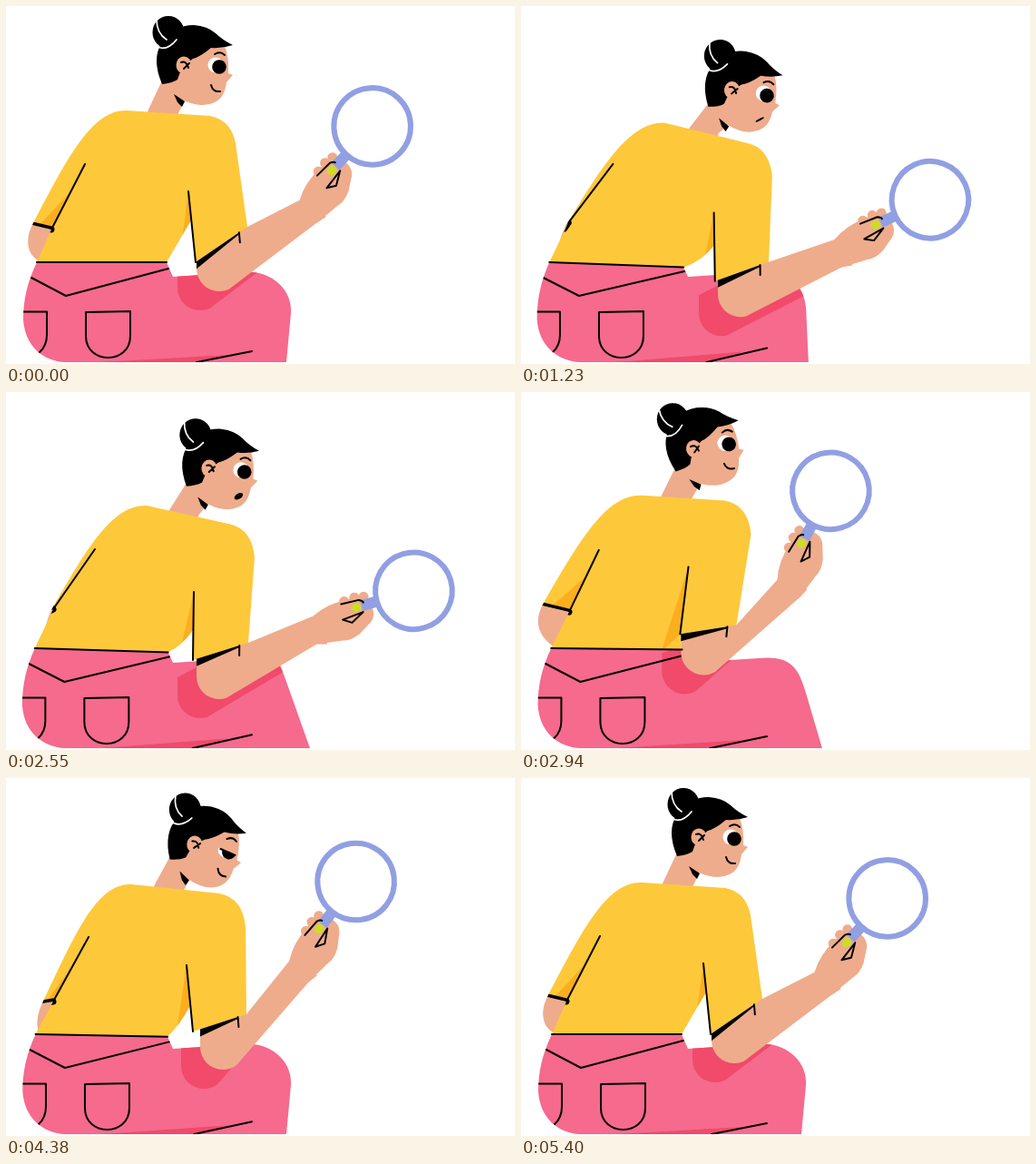
An HTML page with a canvas that plays this animation: 561 by 394 pixels, repeating every 5.43 s.

```html
<!DOCTYPE html>
<html lang="en">
<head>
<meta charset="utf-8">
<title>Woman with a magnifying glass</title>
<style>
html, body { margin: 0; width: 100%; height: 100%; overflow: hidden; background: #fff; }
canvas { display: block; width: 561px; height: 394px; }
</style>
</head>
<body>
<canvas id="stage" width="561" height="394"></canvas>
<script>
const ctx = document.getElementById('stage').getContext('2d');
const LOOP = 5430, STEP = 30;
const SKIN = '#eeac8c', SHIRT = '#fec83b', FOLD = '#fbae1e', PINK = '#f56a8d',
      RED = '#f14a6a', RING = '#919fe3', NAIL = '#cddc28', INK = '#000';

// Each joint in the six main poses.
const joints = {
  ear:      [[196, 64], [222, 83], [258, 112], [224, 83], [191, 62], [208, 72]],
  tilt:     [[0], [3], [13.5], [3], [-10], [10]],
  neck:     [[156, 116], [178, 128], [203, 150], [180, 130], [155, 115], [163, 119]],
  back:     [[133, 115], [152, 124], [172, 139], [155, 125], [133, 114], [138, 117]],
  shoulder: [[225, 121], [242, 142], [262, 171], [245, 145], [225, 120], [235, 127]],
  sleeveUp: [[201, 204], [205, 217], [231, 253], [207, 220], [185, 193], [199, 206]],
  sleeveIn: [[209, 282], [200, 294], [247, 324], [206, 295], [176, 267], [206, 279]],
  sleeveOut:[[266, 243], [261, 275], [302, 298], [267, 276], [238, 257], [265, 260]],
  armpit:   [[.4], [.6], [.15], [.55], [1], [.6]],
  elbow:    [[235, 289], [225, 309], [283, 337], [235, 313], [202, 287], [239, 296]],
  hand:     [[359, 181], [371, 229], [439, 269], [386, 237], [311, 168], [345, 166]],
  wrist:    [[-47.4], [-29.3], [-13.2], [-16], [-60], [-52]],
  cuffOut:  [[29, 241], [46, 247], [52, 240], [50, 240], [24, 235], [40, 248]],
  cuffIn:   [[50, 246], [51, 240], [55, 235], [52, 239], [53, 242], [52, 246]],
  foldTop:  [[87, 174], [97, 173], [112, 176], [98, 173], [86, 174], [91, 175]],
  lean:     [[0], [.55], [1], [.55], [.2], [.35]],
  knee:     [[314, 338], [313, 330], [317, 342], [308, 316], [313, 328], [314, 338]],
  hem:      [[309], [311], [331], [335], [332], [309]],
  mouth:    [[0], [0], [1], [.75], [0], [0]],
  lid:      [[0], [0], [0], [0], [0], [1]]
};

// time, from pose, to pose, amount
const plan = [
  [0, 0, 0, 0], [600, 1, 1, 0], [1140, 1, 2, .22], [1830, 2, 2, 0],
  [2050, 1, 2, 1.05], [2310, 2, 3, .19], [2550, 3, 3, 0], [2880, 3, 4, .9],
  [3080, 3, 4, 1.2], [3420, 4, 4, 0], [4000, 4, 5, 1.25], [4380, 5, 5, 0],
  [4600, 5, 0, .35], [5130, 5, 0, .75], [5400, 0, 0, 0], [5430, 0, 0, 0]
];
const last = plan.length - 1;
const clamp = v => Math.max(0, Math.min(1, v));

function track(poses, axis) {
  const v = plan.map(([, a, b, k]) => poses[a][axis] + (poses[b][axis] - poses[a][axis]) * k);
  const slope = i => (v[i + 1] - v[i]) / (plan[i + 1][0] - plan[i][0]);
  const tan = v.map((_, i) => {
    if (i === 0 || i === last) return 0;
    const p = slope(i - 1), q = slope(i);
    return p * q <= 0 ? 0 : 2 * p * q / (p + q);
  });
  return t => {
    let i = 0;
    while (i < last - 1 && t >= plan[i + 1][0]) i++;
    const d = plan[i + 1][0] - plan[i][0], u = (t - plan[i][0]) / d, w = 1 - u;
    return w * w * ((1 + 2 * u) * v[i] + u * d * tan[i]) +
           u * u * ((3 - 2 * u) * v[i + 1] - w * d * tan[i + 1]);
  };
}
const tracks = Object.entries(joints).map(([name, poses]) =>
  [name, poses[0].map((_, axis) => track(poses, axis))]);

function poseAt(t) {
  const p = {};
  for (const [name, axes] of tracks) p[name] = axes.length > 1 ? axes.map(f => f(t)) : axes[0](t);
  return p;
}

const add = (p, x, y) => [p[0] + x, p[1] + y];
const mix = (p, q, k) => [p[0] + (q[0] - p[0]) * k, p[1] + (q[1] - p[1]) * k];

function fill(path, color) { ctx.fillStyle = color; ctx.fill(path); }
function line(path, width = 2, color = INK) {
  ctx.strokeStyle = color; ctx.lineWidth = width; ctx.stroke(path);
}
function poly(...pts) {
  const path = new Path2D();
  pts.forEach(p => path.lineTo(...p));
  return path;
}
function oval(x, y, rx, ry = rx, turn = 0) {
  const path = new Path2D();
  path.ellipse(x, y, rx, ry, turn, 0, 7);
  return path;
}
function clipped(path, draw) {
  ctx.save(); ctx.clip(path); draw(); ctx.restore();
}
function placed([x, y], degrees, draw) {
  ctx.save(); ctx.translate(x, y); ctx.rotate(degrees * Math.PI / 180); draw(); ctx.restore();
}

function drawNeck(p) {
  const [nx, ny] = p.neck, a = p.tilt * Math.PI / 180, c = Math.cos(a), s = Math.sin(a);
  const onHead = (x, y) => add(p.ear, x * c - y * s, x * s + y * c);
  fill(poly(onHead(-24, 18), [nx, ny], [nx + 2, ny + 12], [nx + 32, ny + 18],
            [nx + 32, ny + 6], onHead(3, 36), onHead(8, 10)), SKIN);
}

function drawLeftArm(p) {
  const [x, y] = p.cuffOut, arm = new Path2D();
  arm.moveTo(x, y);
  arm.bezierCurveTo(x - 9, y + 17, x - 5, y + 35, 38, 281);
  arm.lineTo(...p.cuffIn);
  fill(arm, SKIN);
}

function armPath(p) {
  const [ex, ey] = p.elbow, r = 25, a = p.wrist * Math.PI / 180;
  const at = (x, y) => add(p.hand, x * Math.cos(a) - y * Math.sin(a), x * Math.sin(a) + y * Math.cos(a));
  const low = at(-53, 27), top = at(-48, -4);
  const dir = Math.atan2(low[1] - ey, low[0] - ex);
  const path = new Path2D();
  path.moveTo(ex - r, ey - 20);
  path.lineTo(ex - r, ey);
  path.arc(ex, ey, r, Math.PI, dir + Math.PI / 2, true);
  for (const q of [low, at(-42, 30), at(-30, -8), top, p.sleeveOut, add(p.sleeveOut, -10, -8)]) path.lineTo(...q);
  path.closePath();
  return path;
}

function drawPants(p, arm) {
  const h = p.lean, [kx, ky] = p.knee, left = 34 - 4 * h, right = [177 + 3 * h, 282 + 8 * h];
  const pants = new Path2D();
  pants.moveTo(left, 282);
  pants.lineTo(...right);
  pants.lineTo(184, 298);
  pants.lineTo(262, 293);
  pants.bezierCurveTo(294, 290, kx + (kx - p.hem) * .45, ky + (ky - 391) * .45, kx, ky);
  pants.lineTo(p.hem, 392);
  pants.lineTo(66, 392);
  pants.bezierCurveTo(40, 391, 21 - 2 * h, 374, 19 - 2 * h, 345);
  pants.bezierCurveTo(19 - 2 * h, 322, 24 - 3 * h, 303, left, 282);
  fill(pants, PINK);
  clipped(pants, () => {
    ctx.save(); ctx.translate(-21, 21); fill(arm, RED); ctx.restore();
    const rise = 381 - 5 * h;
    fill(poly([105, 392], [245, rise + 3], [208, 392]), RED);
    line(poly([210 - 8 * h, 392], [271, rise - 1]));
    line(poly([28 - 5 * h, 299], [66 - 3 * h, 319], [179 + 3 * h, 289 + 4 * h]));
    const x = 88 - 3 * h, pocket = new Path2D();
    pocket.moveTo(x, 337);
    pocket.lineTo(x + 49, 336);
    pocket.lineTo(x + 49, 363);
    pocket.bezierCurveTo(x + 49, 395, x, 395, x, 363);
    pocket.closePath();
    line(pocket);
    const side = new Path2D();
    side.moveTo(15, 336.5);
    side.lineTo(45 - 3 * h, 336.5);
    side.lineTo(45 - 3 * h, 362);
    side.quadraticCurveTo(45 - 3 * h, 374, 37 - 3 * h, 381);
    line(side);
  });
}

function drawShirt(p) {
  const h = p.lean, left = [34 - 4 * h, 282], right = [177 + 3 * h, 282 + 8 * h];
  const [lx, ly] = p.cuffOut, [bx, by] = p.back, [sx, sy] = p.shoulder;
  const pit = mix(p.sleeveUp, p.sleeveIn, clamp(p.armpit));
  const shirt = new Path2D();
  shirt.moveTo(...left);
  shirt.lineTo(...p.cuffIn);
  shirt.lineTo(lx, ly);
  shirt.bezierCurveTo(lx + (bx - lx) * .38, ly + (by - ly) * .6, bx - 38, by - 1, bx, by);
  shirt.lineTo(sx, sy);
  shirt.quadraticCurveTo(sx + 26, sy + 5, sx + 29, sy + 37);
  shirt.lineTo(...p.sleeveOut);
  shirt.lineTo(...p.sleeveIn);
  shirt.lineTo(...pit);
  shirt.quadraticCurveTo(pit[0] + (right[0] - pit[0]) * (.5 - .1 * h), pit[1] + (right[1] - pit[1]) * (.5 + .4 * h), ...right);
  shirt.closePath();
  fill(shirt, SHIRT);
  clipped(shirt, () => {
    fill(poly(p.sleeveUp, add(p.sleeveIn, -21, 20), p.sleeveIn), FOLD);
    fill(poly(mix(p.foldTop, p.cuffIn, .42), mix(p.cuffOut, p.cuffIn, .3), p.cuffIn), FOLD);
    line(poly(p.cuffOut, p.cuffIn), 7);
    line(poly(p.foldTop, p.cuffIn));
  });
  line(poly(left, right));
  line(poly(p.sleeveUp, p.sleeveIn));

  const inX = p.elbow[0] - 25, span = p.sleeveOut[0] - p.sleeveIn[0];
  const start = mix(p.sleeveIn, p.sleeveOut, (inX - p.sleeveIn[0]) / span);
  const end = mix(p.sleeveIn, p.sleeveOut, .84);
  fill(poly(start, add(start, 0, 8), add(end, 0, 2), end), INK);
  const dx = (p.sleeveIn[0] - p.sleeveUp[0]) * .12;
  line(poly(end, add(end, dx, 11)));
}

function drawHand(p) {
  placed(p.hand, p.wrist, () => {
    const palm = new Path2D();
    palm.moveTo(-54, 0);
    palm.lineTo(-48, -4);
    palm.quadraticCurveTo(-30, -13, -8, -11);
    palm.lineTo(10, -12);
    palm.quadraticCurveTo(17, -8, 17, 4);
    palm.quadraticCurveTo(18, 15, 11, 20);
    palm.lineTo(-4, 29);
    palm.quadraticCurveTo(-16, 34, -24, 31);
    palm.lineTo(-54, 27);
    palm.closePath();
    fill(palm, SKIN);
    for (const [x, y] of [[-11, -10], [1, -11], [11, -9]]) fill(oval(x, y, 5.5), SKIN);
    line(oval(66, 0, 42.3), 6, RING);
    ctx.fillStyle = RING;
    ctx.fillRect(6, -6, 19, 12);
    const grip = new Path2D();
    grip.moveTo(-15, -8);
    grip.lineTo(5, -7);
    grip.quadraticCurveTo(9, -5, 9, -3);
    line(grip);
    const thumb = poly([6, 7], [-18, 9], [-9, 15]);
    thumb.closePath();
    line(thumb);
    fill(oval(0, 0, 5.5, 4.7), NAIL);
  });
}

function drawHead(p) {
  placed(p.ear, p.tilt, () => {
    ctx.translate(-196, -64);
    const face = new Path2D();
    face.moveTo(180, 60);
    face.lineTo(210, 46);
    face.lineTo(241, 44);
    face.quadraticCurveTo(246, 56, 245, 74);
    face.lineTo(250, 76);
    face.lineTo(243, 84);
    face.quadraticCurveTo(241, 101, 230, 106);
    face.quadraticCurveTo(216, 113, 196, 104);
    face.lineTo(184, 94);
    face.closePath();
    fill(face, SKIN);
    fill(poly([185, 97], [197, 105], [194, 111], [189, 106]), INK);

    fill(oval(179, 29, 17.5, 18), INK);
    const hair = new Path2D();
    hair.moveTo(172, 86);
    hair.quadraticCurveTo(160, 58, 172, 40);
    hair.quadraticCurveTo(184, 21, 207, 21);
    hair.quadraticCurveTo(222, 22, 231, 30);
    hair.quadraticCurveTo(238, 37, 250, 43);
    hair.quadraticCurveTo(238, 47, 226, 46);
    hair.quadraticCurveTo(214, 56, 206, 58);
    hair.quadraticCurveTo(193, 66, 189, 81);
    hair.quadraticCurveTo(183, 85, 172, 86);
    fill(hair, INK);
    const bow = new Path2D();
    bow.moveTo(166, 15);
    bow.quadraticCurveTo(166, 30, 177, 37);
    bow.moveTo(163, 43);
    bow.quadraticCurveTo(176, 52, 188, 37);
    line(bow, 1.7, '#fff');

    fill(oval(196, 65, 8.5, 9.5), SKIN);
    const ear = new Path2D();
    ear.moveTo(193, 62);
    ear.quadraticCurveTo(199, 60, 201, 68);
    ear.moveTo(202, 63);
    ear.lineTo(196, 69);
    line(ear);

    const lid = clamp(p.lid), eye = new Path2D();
    eye.moveTo(218, 55 + lid * 8);
    eye.lineTo(246, 55 + lid * 15);
    eye.lineTo(246, 80);
    eye.lineTo(218, 80);
    clipped(eye, () => {
      fill(oval(231, 65, 8.5, 8.5), '#fff');
      fill(oval(235, 67, 7.8, 7.8), INK);
    });
    if (lid > .3) line(poly([225, 57 + lid * 8], [242, 55 + lid * 14]));
    const brow = new Path2D();
    brow.moveTo(230, 53);
    brow.quadraticCurveTo(236, 49, 241, 54);
    line(brow);

    const open = clamp(p.mouth);
    if (open > .12) {
      fill(oval(230, 94, 5.2, 4 * open, -.6), INK);
    } else {
      const smile = new Path2D();
      smile.moveTo(226, 87);
      smile.quadraticCurveTo(228, 95, 236, 94);
      line(smile);
    }
  });
}

function draw(t) {
  const p = poseAt(t), arm = armPath(p);
  ctx.fillStyle = '#fff';
  ctx.fillRect(0, 0, 561, 394);
  ctx.lineJoin = ctx.lineCap = 'round';
  ctx.save();
  ctx.beginPath();
  ctx.rect(0, 0, 561, 392);
  ctx.clip();
  drawNeck(p);
  drawLeftArm(p);
  drawPants(p, arm);
  fill(arm, SKIN);
  drawShirt(p);
  drawHand(p);
  drawHead(p);
  ctx.restore();
}

const began = performance.now();
function tick() {
  const t = (performance.now() - began) % LOOP;
  draw(Math.floor(t / STEP) * STEP);
  requestAnimationFrame(tick);
}
tick();
</script>
</body>
</html>
```
